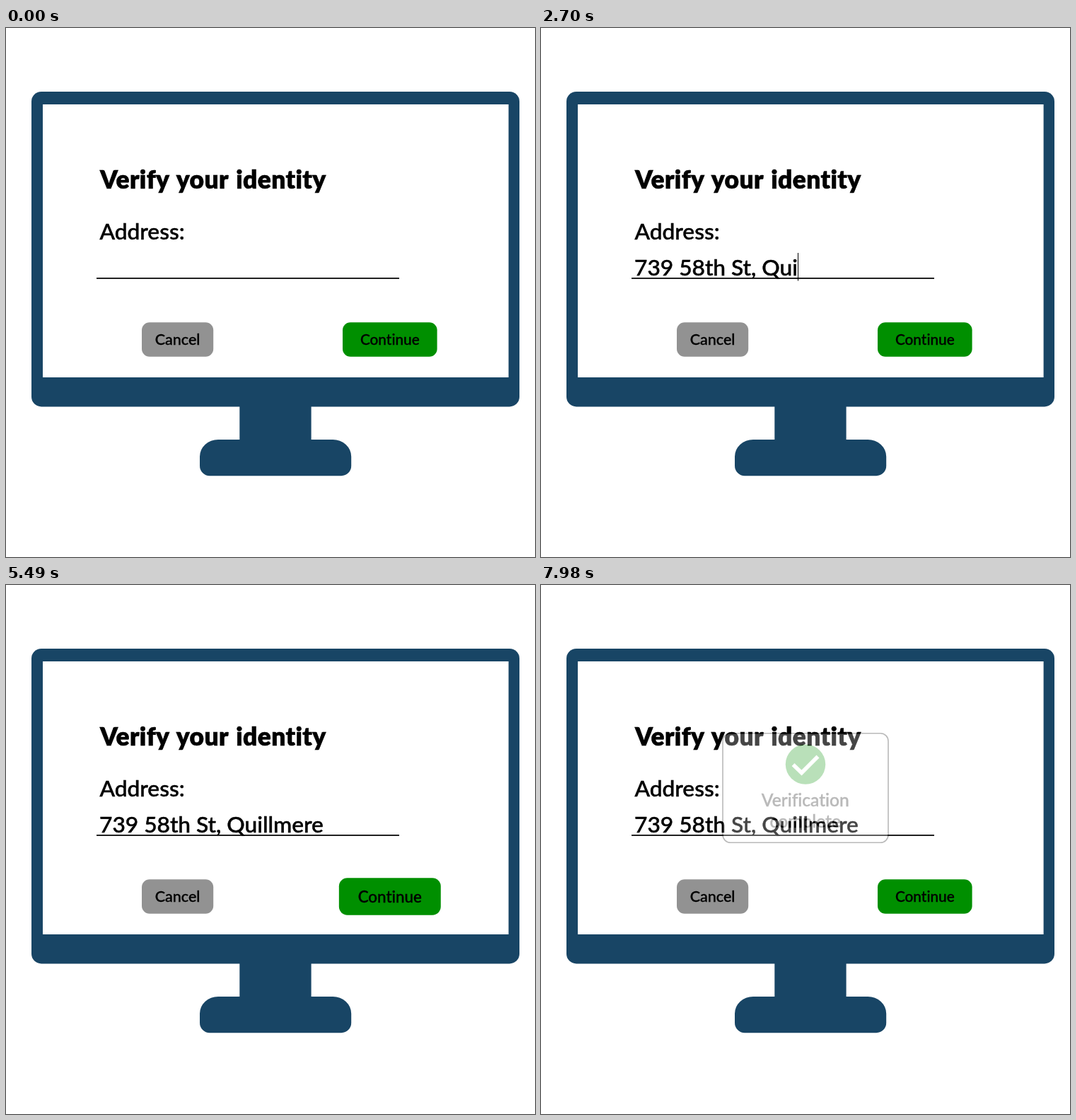
An HTML page that plays this animation: 748 px wide and 748 px high, repeating every 8 s.

```html
<!DOCTYPE html>
<html lang="en">
<head>
<meta charset="utf-8">
<title>Verify your identity</title>
<style>
  html, body { margin: 0; width: 100%; height: 100%; overflow: hidden; background: #fff; }
  svg { display: block; width: 100vw; height: 100vh; }
  text {
    font-family: Lato, "Open Sans", sans-serif; font-weight: 500; white-space: pre;
    font-variant-ligatures: none; stroke: #000; stroke-width: .016em;
  }
  .title { font-weight: 900; letter-spacing: .4px; word-spacing: 2.6px; }
  .mid { text-anchor: middle; }
</style>
</head>
<body>
<svg viewBox="0 0 748 748">
  <g fill="#184565">
    <rect x="36" y="90" width="690" height="445.4" rx="14"/>
    <rect x="330.3" y="530" width="101.3" height="60"/>
    <path d="M300 582H462A26 24 0 0 1 488.2 606V619A14 14 0 0 1 474 633.2H288A14 14 0 0 1 274 619V606A26 24 0 0 1 300 582Z"/>
  </g>
  <rect x="52" y="108" width="658.6" height="386" fill="#fff"/>

  <text class="title" x="133" y="227" font-size="35.3">Verify your identity</text>
  <text x="132.5" y="299" font-size="31.7">Address:</text>
  <text id="field" x="132" y="350" font-size="31.7"></text>
  <path d="M128 353.9H556" stroke="#000" stroke-width="1.6"/>
  <path id="caret" d="M0 318V357.5" stroke="#000" stroke-width="1"/>

  <rect x="192" y="416.2" width="101.2" height="48.6" rx="11" fill="#929292"/>
  <text class="mid" x="242.6" y="448" font-size="21.5">Cancel</text>
  <g id="next">
    <rect x="476" y="416.2" width="133.6" height="48.6" rx="11" fill="#008f00"/>
    <text class="mid" x="542.8" y="448" font-size="20.8">Continue</text>
  </g>

  <g id="card">
    <rect x="257" y="209.7" width="234" height="154.6" rx="11" fill="#fff" stroke="#000" stroke-width="1.6"/>
    <circle cx="374" cy="253.6" r="28.2" fill="#008f00"/>
    <path d="M356.5 254L368.5 265.5L391.5 242.5" fill="none" stroke="#fff" stroke-width="5.6"/>
    <text class="mid" x="373.8" y="313.3" font-size="24.6">Verification</text>
    <text class="mid" x="373.8" y="342.8" font-size="24.6">complete</text>
  </g>
</svg>
<script>
  const LOOP = 8000, TICK = 30;
  const ADDRESS = "739 58th St, Quillmere";
  // Typing bursts: time of first key, gap between keys, number of keys
  const BURSTS = [[1080, 150, 5], [1740, 45, 3], [1950, 108, 6], [2580, 111, 8]];

  const [field, caret, next, card] =
    ["field", "caret", "next", "card"].map(id => document.getElementById(id));

  const clamp = v => Math.min(1, Math.max(0, v));
  const ramp = (t, from, to) => clamp((t - from) / (to - from));
  const mix = (a, b, u) => a + (b - a) * u;
  const smooth = u => (1 - Math.cos(Math.PI * u)) / 2;
  const scaleAt = (x, y, s) => `translate(${x} ${y}) scale(${s}) translate(${-x} ${-y})`;

  function typedCount(t) {
    return BURSTS.reduce((sum, [start, gap, keys]) =>
      sum + (t < start ? 0 : Math.min(keys, Math.floor((t - start) / gap) + 1)), 0);
  }

  function drawField(t) {
    const typed = ADDRESS.slice(0, typedCount(t));
    if (field.textContent !== typed) field.textContent = typed;
    const width = typed ? field.getComputedTextLength() : 0;
    caret.setAttribute("transform", `translate(${132.5 + width} 0)`);
    caret.setAttribute("opacity", ramp(t, 900, 1080) * (1 - ramp(t, 3360, 3600)));
  }

  function drawButton(t) {
    const pulse = smooth(ramp(t, 4965, 5315)) * (1 - smooth(ramp(t, 5315, 5850)));
    next.setAttribute("transform", scaleAt(542.8, 440.5, 1 + 0.102 * pulse));
  }

  function drawCard(t) {
    const grow = 1 - (1 - ramp(t, 7710, 7980)) ** 1.4;
    card.setAttribute("transform", scaleAt(374, 287, mix(1 / 3, 1, grow)));
    card.setAttribute("opacity", t < 7710 ? 0 : mix(0.075, 0.27, grow));
  }

  function draw(now) {
    const t = Math.floor((now % LOOP) / TICK) * TICK;
    drawField(t);
    drawButton(t);
    drawCard(t);
  }

  const start = performance.now();
  function loop() {
    draw(performance.now() - start);
    requestAnimationFrame(loop);
  }
  loop();
</script>
</body>
</html>
```
